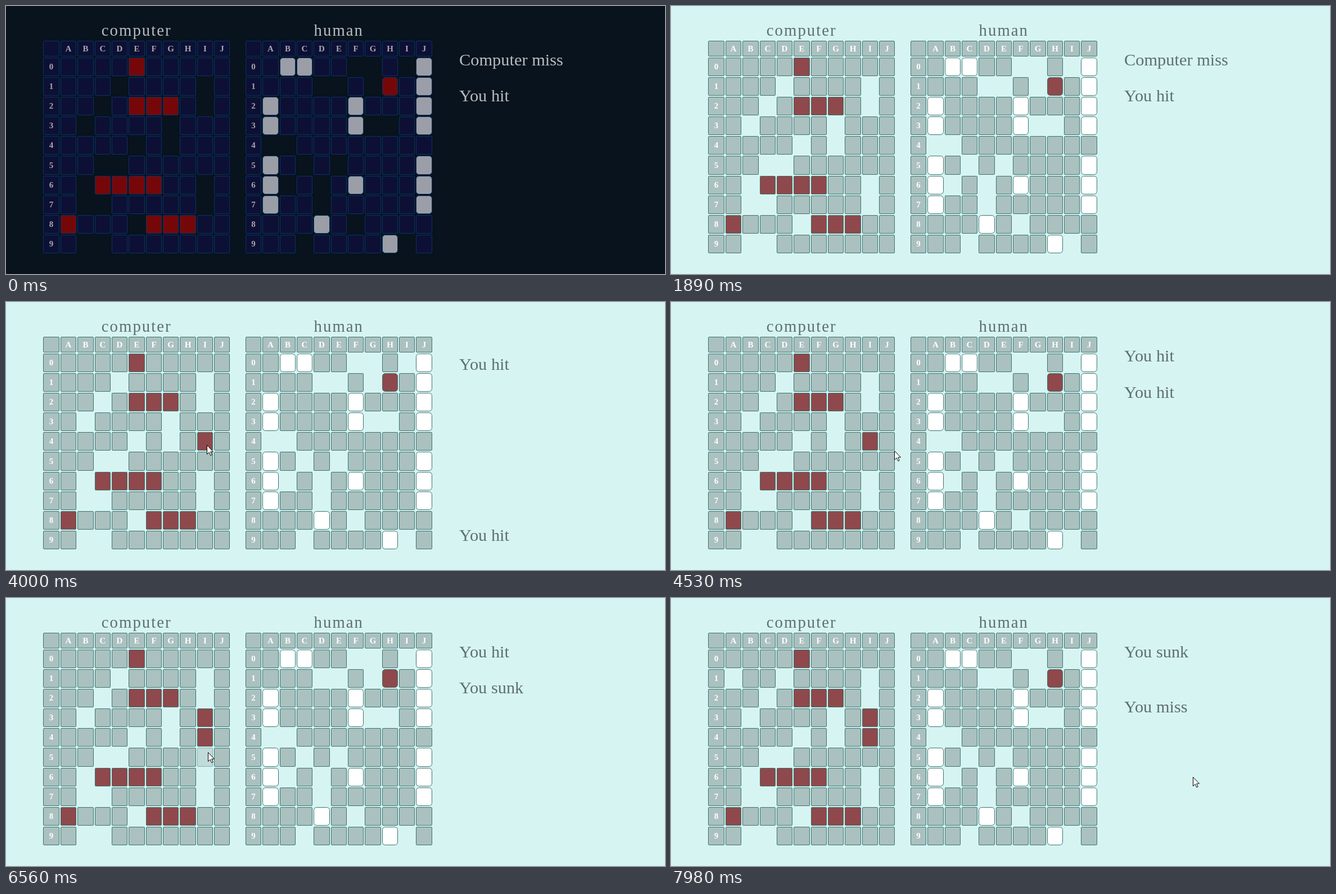
Recreate the animation shown at these times as an HTML page with a canvas. Size 1172 by 478 pixels, loop 8000 ms.

```html
<!DOCTYPE html>
<html lang="en">
<head>
<meta charset="utf-8">
<title>Battleship</title>
<style>
html, body { margin: 0; width: 100%; height: 100%; overflow: hidden; background: #08131d; }
canvas { display: block; }
</style>
</head>
<body>
<canvas id="stage" width="1172" height="478"></canvas>
<script>
const ctx = document.getElementById('stage').getContext('2d');
const LOOP = 8000, W = 1172, H = 478;
const SERIF = '"Liberation Serif", serif';
const COLUMNS = 'ABCDEFGHIJ';

const DARK = {
  bg: '#08131d', cell: '#0d1034', line: '#06336a',
  label: '#a6a8ad', text: '#b9bcbf', hit: '#760709', ship: '#9c9ea7'
};
const LIGHT = {
  bg: '#d6f4f2', cell: '#aac1bf', line: '#39736f',
  label: '#ffffff', text: '#5f6f6f', hit: '#8f484b', ship: '#ffffff'
};
const THEME_SWITCH = 1890;

// '.' untouched, '_' miss, 'x' hit, 's' ship, 'X' hit ship
const COMPUTER = [
  '....x.....', '..._...._.', '.._.xxx._.', '._...._...', '...._._...',
  '..__......', '._xxxx.._.', '.__....._.', 'x..._xxx..', '.__.......'
];
const HUMAN = [
  '.ss..__._s', '...__._X.s', 's....s...s', 's....s__.s', '__........',
  's._._....s', 's_._.s...s', 's.._.....s', '...s._....', '.._....s_.'
];

const OPENING = ['Computer miss', 'You hit'];
const SHOTS = [
  { at: 3780, cell: 'I4', mark: 'x', text: 'You hit' },
  { at: 5670, cell: 'I3', mark: 'x', text: 'You sunk' },
  { at: 7440, cell: 'A1', mark: '_', text: 'You miss' }
];
const MESSAGES = [...OPENING, ...SHOTS.map(s => s.text)];
const FIRST_Y = 106, GAP = 64, SLIDE = 800;

// Resting points of the pointer
const STOPS = [
  { at: 2640, x: 98, y: 27 }, { at: 3050, x: 309, y: 272 }, { at: 3190, x: 341, y: 268 },
  { at: 3320, x: 357, y: 250 }, { at: 4130, x: 357, y: 255 }, { at: 4530, x: 397, y: 265 },
  { at: 5480, x: 355, y: 210 }, { at: 6420, x: 367, y: 292 }, { at: 6560, x: 359, y: 275 },
  { at: 6710, x: 200, y: 219 }, { at: 6990, x: 115, y: 150 }, { at: 7440, x: 124, y: 140 },
  { at: 7980, x: 928, y: 319 }
];
const HOVER_LAG = 40;

const smooth = p => p * p * (3 - 2 * p);
const colX = (left, i) => Math.round(left + 30.34 * i);
const rowY = j => j < 0 ? 62 : Math.round(91.9 + 35.1 * j);

// CSS "ease" curve, solved by bisection
function ease(p) {
  if (p >= 1) return 1;
  let lo = 0, hi = 1, s = 0.5;
  for (let i = 0; i < 24; i++) {
    s = (lo + hi) / 2;
    if (0.75 * s * (1 - s) + s ** 3 < p) lo = s; else hi = s;
  }
  return 0.3 * s * (1 - s) ** 2 + 3 * s * s * (1 - s) + s ** 3;
}

function pointerAt(t) {
  if (t < STOPS[0].at) return null;
  const k = STOPS.findIndex(s => s.at > t);
  if (k < 0) return STOPS[STOPS.length - 1];
  const a = STOPS[k - 1], b = STOPS[k];
  const p = smooth((t - a.at) / (b.at - a.at));
  return { x: Math.round(a.x + (b.x - a.x) * p), y: Math.round(a.y + (b.y - a.y) * p) };
}

function text(str, x, y, font, color, align = 'left', spacing = 0) {
  ctx.font = font + ' ' + SERIF;
  ctx.fillStyle = color;
  ctx.textAlign = align;
  ctx.letterSpacing = spacing + 'px';
  ctx.fillText(str, x, y);
}

function box(x, y, w, h, r, fill, line) {
  ctx.beginPath();
  ctx.roundRect(x + 0.5, y + 0.5, w - 1, h - 1, r);
  ctx.fillStyle = fill;
  ctx.fill();
  ctx.strokeStyle = line;
  ctx.stroke();
}

function drawCell(state, x, y, w, h, c) {
  if (state === '_') return;
  const fill = { x: c.hit, X: c.hit, s: c.ship }[state] || c.cell;
  box(x, y, w, h, 'Xs'.includes(state) ? 5 : 1.5, fill, c.line);
}

function drawBoard(title, titleX, left, rows, c, shots, pointer) {
  text(title, titleX, 53, '28.8px', c.text, 'left', 2);
  for (let j = -1; j < 10; j++) {
    for (let i = 0; i < 11; i++) {
      const x = colX(left, i), y = rowY(j);
      const w = colX(left, i + 1) - 2 - x, h = rowY(j + 1) - 2 - y;
      if (j < 0 || i === 0) {
        const label = i ? COLUMNS[i - 1] : j < 0 ? '' : String(j);
        box(x, y, w, h, 1.5, c.cell, c.line);
        text(label, x + w / 2, y + Math.floor(h / 2) + 4.5, 'bold 15px', c.label, 'center');
        continue;
      }
      const shot = shots.find(s => s.cell === COLUMNS[i - 1] + j);
      const state = shot ? shot.mark : rows[j][i - 1];
      const hovered = state === '.' && pointer &&
        pointer.x >= x && pointer.x < x + w && pointer.y >= y && pointer.y < y + h;
      ctx.globalAlpha = hovered ? 0.48 : 1;
      drawCell(state, x, y, w, h, c);
      ctx.globalAlpha = 1;
    }
  }
}

// Each shot pushes the list up; the new line slides in from below.
function drawMessages(t, shots, c) {
  const put = (i, y) => text(MESSAGES[i], 806, y, '30.4px', c.text);
  const n = shots.length;
  const age = n ? t - shots[n - 1].at : SLIDE;
  const rise = Math.min(GAP, age * 0.22);
  if (n && age < 200) {
    ctx.globalAlpha = 1 - age / 200;
    put(n - 1, FIRST_Y - rise);
    ctx.globalAlpha = 1;
  }
  put(n, FIRST_Y + GAP - rise);
  put(n + 1, FIRST_Y + GAP + H * (1 - ease(age / SLIDE)));
}

function drawPointer({ x, y }) {
  ctx.save();
  ctx.translate(x + 0.5, y + 0.5);
  const arrow = new Path2D('M0 0V16L3.7 12.6 6.3 18.2 8.7 17.2 6.2 11.6 11 11.5Z');
  ctx.fillStyle = '#fff';
  ctx.fill(arrow);
  ctx.strokeStyle = '#000';
  ctx.stroke(arrow);
  ctx.restore();
}

function draw(t) {
  const c = t < THEME_SWITCH ? DARK : LIGHT;
  const shots = SHOTS.filter(s => t >= s.at);
  const pointer = pointerAt(t);
  ctx.fillStyle = c.bg;
  ctx.fillRect(0, 0, W, H);
  ctx.lineWidth = 1;
  drawBoard('computer', 169.8, 66.49, COMPUTER, c, shots, pointerAt(t - HOVER_LAG));
  drawBoard('human', 547.6, 425.83, HUMAN, c, [], null);
  drawMessages(t, shots, c);
  if (pointer) drawPointer(pointer);
}

function loop() {
  draw(performance.now() % LOOP);
  requestAnimationFrame(loop);
}
loop();
</script>
</body>
</html>
```
